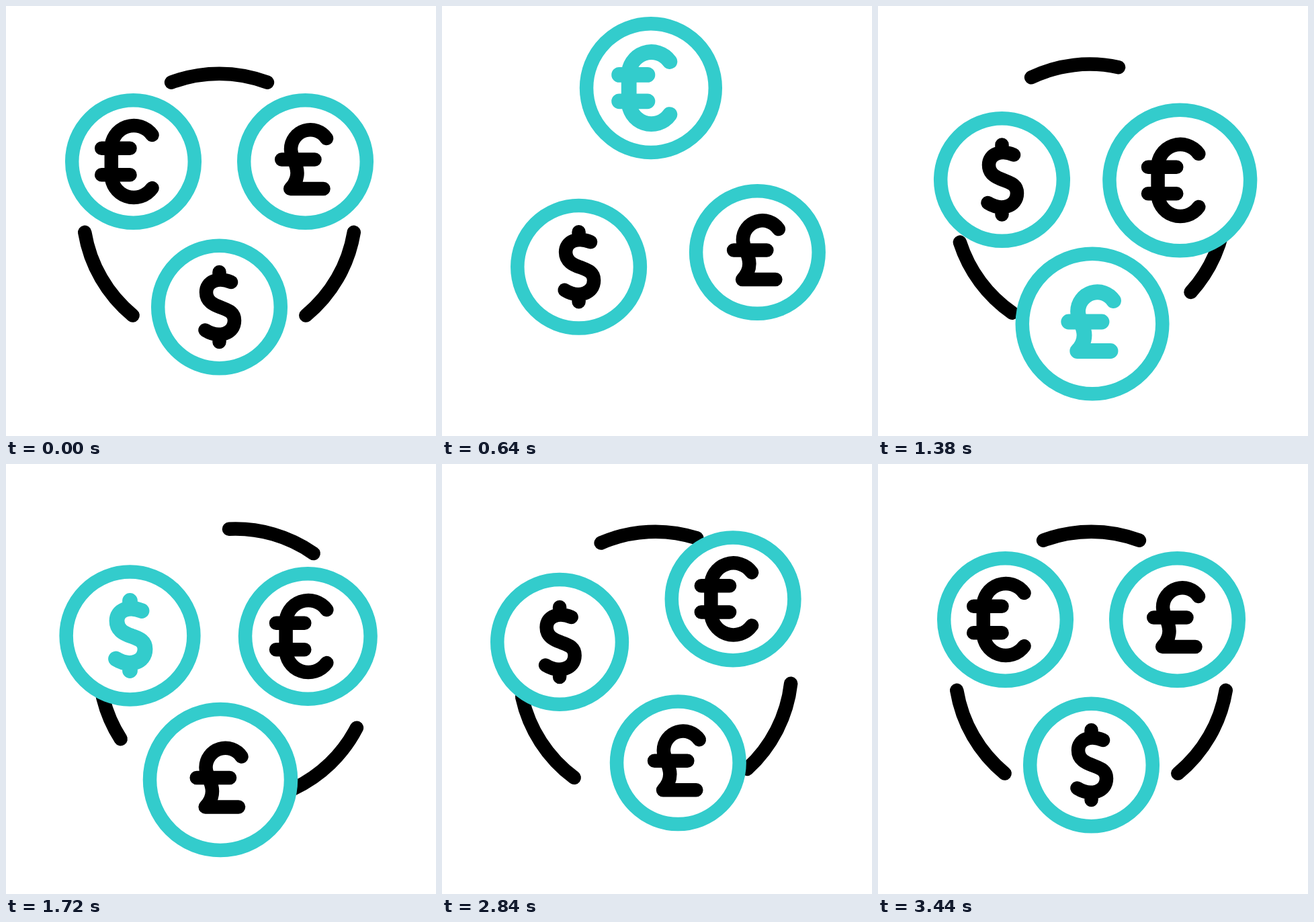
Write an HTML page that moves like this. It is 640x640 px and loops after 3.6 s.

```html
<!DOCTYPE html>
<html lang="en">
<head>
<meta charset="utf-8">
<title>Currency exchange</title>
<style>
html, body { margin: 0; width: 100%; height: 100%; overflow: hidden; background: #fff; }
svg { display: block; width: 100vw; height: 100vh; }
path { fill: none; stroke-width: 20.5; stroke-linecap: round; stroke-linejoin: round; }
</style>
</head>
<body>
<svg viewBox="0 0 640 640">
  <g id="arcs" stroke="#000"></g>
  <g id="coins"></g>
</svg>
<script>
const LOOP = 3600, TEAL = '#33cccc', BLACK = '#000';
const REST_R = 91.3, GROW = 13.7, STROKE = 20.5;
const ARC_R = 203, ARC_HALF = 20.6;

// Each coin travels along a cubic curve; its ring swells from `pulse` on.
const coins = [
  {
    glyph: 'M28-39.5A33.5 33.5 0 0 0-32.7-18V18A33.5 33.5 0 0 0 28 39.5M-47.3-19.7H-5M-47.3 19.7H-5',
    curve: [[189.5, 231.5], [238.5, 106], [400, 106], [449.3, 232.5]],
    pulse: 445
  },
  {
    glyph: 'M31.5-34.5A29 29 0 0 0-21.5-18.5C-21.5-6-12 2-12 17C-12 26-16 34-22.3 40.5H27M-35.3-3H14',
    curve: [[445.5, 231.5], [547, 360], [438, 450], [319, 446]],
    pulse: 955
  },
  {
    glyph: 'M17.5-37C-2-45-19.5-38-19.5-22C-19.5-8-8-3 2 .5C12 4.5 22.5 7 22.5 20C22.5 40-1 47-21 34.5M0-52V-42M0 42V52',
    curve: [[317.5, 448], [225, 480], [138.5, 353], [184.5, 231.5]],
    pulse: 1550
  }
];

function add(parent, tag, attrs) {
  const el = document.createElementNS('http://www.w3.org/2000/svg', tag);
  for (const key in attrs) el.setAttribute(key, attrs[key]);
  return parent.appendChild(el);
}

const arcGroup = document.getElementById('arcs');
const arcs = [0, 120, 240].map(turn => add(arcGroup, 'path', { transform: `rotate(${turn})` }));
for (const coin of coins) {
  coin.group = add(document.getElementById('coins'), 'g', {});
  coin.ring = add(coin.group, 'circle', { fill: '#fff', stroke: TEAL, 'stroke-width': STROKE });
  coin.mark = add(coin.group, 'path', { d: coin.glyph });
}

const part = (t, from, to) => Math.min(1, Math.max(0, (t - from) / (to - from)));
const ramp = (t, from, to) => (1 - Math.cos(Math.PI * part(t, from, to))) / 2;

function cubic(a, b, c, d, s) {
  const r = 1 - s;
  return r * r * r * a + 3 * r * r * s * b + 3 * r * s * s * c + s * s * s * d;
}

// CSS-like timing curve with control points (x1, 0) and (x2, 1)
function ease(x, x1, x2) {
  let lo = 0, hi = 1;
  for (let i = 0; i < 24; i++) {
    const mid = (lo + hi) / 2;
    if (cubic(0, x1, x2, 1, mid) < x) lo = mid; else hi = mid;
  }
  return cubic(0, 0, 1, 1, lo);
}

// The arcs lean back, swing a third of a turn and settle.
function drawArcs(t) {
  const lean = ramp(t, 640, 1040);
  const dx = -22 * lean + 46 * ramp(t, 1100, 1720) - 24 * ramp(t, 1850, 2850);
  const dy = -17 * lean + 17 * ramp(t, 1150, 2000);
  const turn = -9.7 * ramp(t, 200, 1080) + 129.7 * ease(part(t, 1180, 3100), 0.41, 0.45);
  const half = ARC_HALF - 1.8 * (ramp(t, 200, 640) - ramp(t, 2200, 2840));
  const x = ARC_R * Math.sin(half * Math.PI / 180);
  const y = -ARC_R * Math.cos(half * Math.PI / 180);

  arcGroup.setAttribute('transform', `translate(${317.5 + dx} ${303.7 + dy}) rotate(${turn})`);
  for (const arc of arcs) arc.setAttribute('d', `M${-x} ${y}A${ARC_R} ${ARC_R} 0 0 1 ${x} ${y}`);
}

function drawCoins(t) {
  const along = t < 2700 ? ease(part(t, 200, 1400), 0.5, 0.17) : 1 - ramp(t, 2700, 3420);
  const bob = -16 * ramp(t, 200, 600) + 43 * ramp(t, 600, 1330) - 27 * ramp(t, 1450, 2700);

  for (const { group, ring, mark, curve, pulse } of coins) {
    const [x, y] = [0, 1].map(axis => cubic(...curve.map(p => p[axis]), along));
    const age = t - pulse;
    const swell = ramp(age, 0, 500) - ramp(age, 900, 1400);
    const lit = age >= 0 && age < 700;
    group.setAttribute('transform', `translate(${x} ${y + bob})`);
    ring.setAttribute('r', REST_R + GROW * swell);
    mark.style.stroke = lit ? TEAL : BLACK;
    mark.style.strokeWidth = lit ? 22.8 : STROKE;
  }
}

function draw(t) {
  drawArcs(t);
  drawCoins(t);
}

function tick() {
  draw(performance.now() % LOOP);
  requestAnimationFrame(tick);
}
draw(0);
requestAnimationFrame(tick);
</script>
</body>
</html>
```
